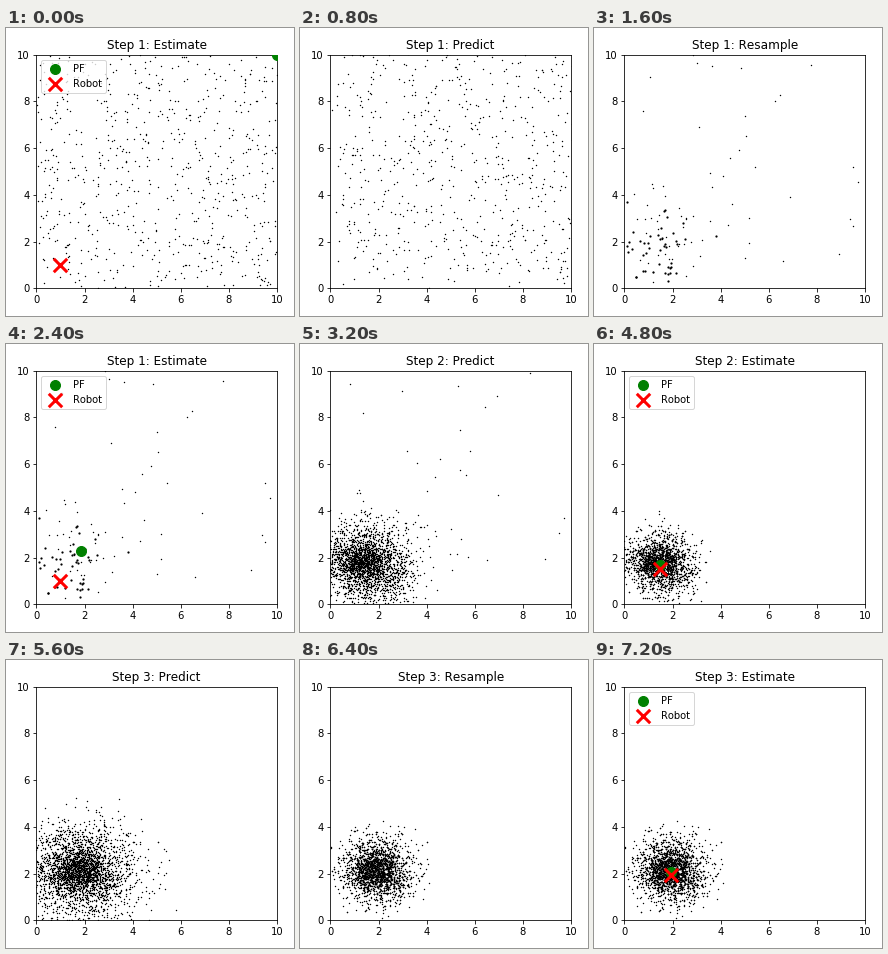
A matplotlib script that plays this animation: 288x288 px, repeating every 8 s.

```python
import numpy as np
import matplotlib.pyplot as plt
from matplotlib.animation import FuncAnimation

plt.rcParams["text.kerning_factor"] = 6  # whole-pixel kerning
rng = np.random.default_rng(7)
STEP_MS = 800
NONE = np.empty((0, 2))


def cloud(n, center, core, wide):
    """Dense core with a wider halo."""
    spread = np.where(rng.random((n, 1)) < 0.3, core, wide)
    return np.array(center) + rng.normal(size=(n, 2)) * spread


def move(pts, shift, spread):
    return pts + shift + rng.normal(0, spread, pts.shape)


def resample(pts, center, spread):
    d2 = ((pts - center) ** 2).sum(axis=1)
    weight = np.exp(-d2 / (2 * spread ** 2)) * (d2 < 5.5)
    return pts[rng.choice(len(pts), len(pts), p=weight / weight.sum())]


start = rng.uniform(0, 10, (640, 2))
predict1 = move(start, 0.35, 0.25)

# After the first weighting few particles survive; the near ones repeat
strays = rng.uniform((0.5, 1), (10, 10), (34, 2))
near = rng.normal((1.3, 1.6), (0.8, 0.8), (45, 2))
resample1 = np.vstack([rng.normal((2.2, 2.4), (1.0, 1.0), (35, 2)), strays])

predict2 = np.vstack([cloud(2200, (1.3, 1.85), (0.5, 0.4), (1.05, 0.95)),
                      rng.normal((2.3, 1.2), 0.6, (350, 2)),
                      move(strays, 0.25, 0.4)])
resample2 = resample(predict2, (1.55, 1.7), 0.95)
predict3 = cloud(2900, (1.8, 2.08), (0.6, 0.45), (1.2, 1.05))
resample3 = resample(predict3, (2.1, 2.2), 0.95)

# predicted, resampled, repeated, estimate, robot
STEPS = [
    (predict1, resample1, near, (1.85, 2.3), (1, 1)),
    (predict2, resample2, NONE, (1.48, 1.69), (1.5, 1.5)),
    (predict3, resample3, NONE, (1.95, 2.08), (1.95, 1.95)),
]

# title, particles, repeated particles, (estimate, robot)
scenes = [("Step 1: Estimate", start, NONE, ((10, 10), (1, 1)))]
for k, (predicted, kept, repeated, guess, truth) in enumerate(STEPS, 1):
    scenes += [
        (f"Step {k}: Predict", predicted, NONE, None),
        (f"Step {k}: Resample", kept, repeated, None),
        (f"Step {k}: Estimate", kept, repeated, (guess, truth)),
    ]

fig, ax = plt.subplots(figsize=(4, 4), dpi=72)
ax.set(xlim=(0, 10), ylim=(0, 10))
title = ax.set_title(scenes[0][0])
dots = ax.scatter([], [], s=2, c="black", linewidths=0)
heavy = ax.scatter([], [], s=5, c="black", linewidths=0)
estimate = ax.scatter([10], [10], s=100, c="green", label="PF", zorder=3)
robot = ax.scatter([1], [1], s=180, c="red", marker="x", linewidths=3,
                   label="Robot", zorder=4)
legend = ax.legend(loc="upper left")
fig.tight_layout()


def draw(i):
    text, pts, repeated, markers = scenes[i]
    title.set_text(text)
    dots.set_offsets(pts)
    heavy.set_offsets(repeated)
    for artist in (estimate, robot, legend):
        artist.set_visible(markers is not None)
    if markers:
        estimate.set_offsets([markers[0]])
        robot.set_offsets([markers[1]])
    return dots, heavy, estimate, robot, legend, title


anim = FuncAnimation(fig, draw, frames=len(scenes), interval=STEP_MS,
                     repeat=True, repeat_delay=0)
plt.show()
```
